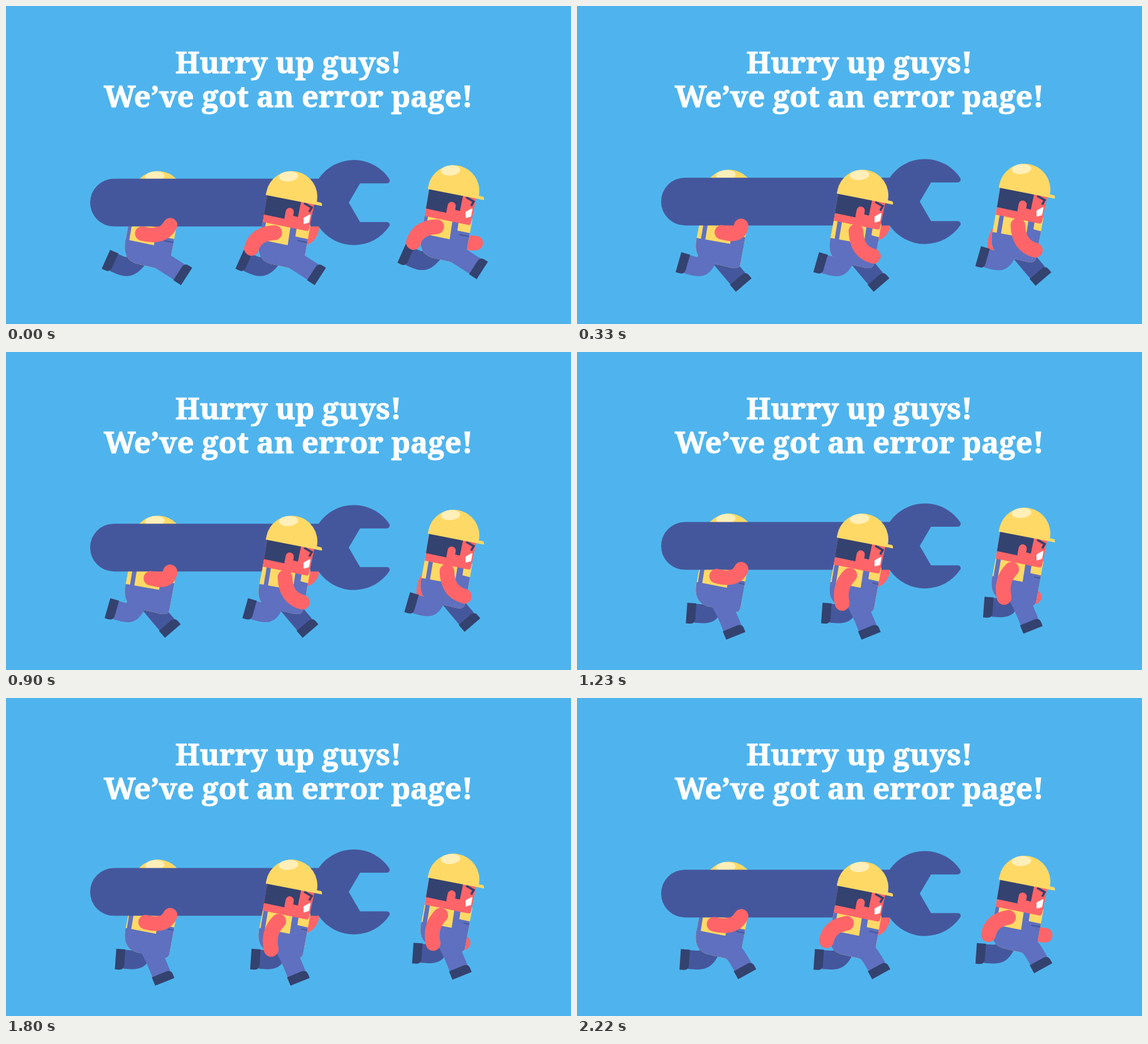
These frames come from a looping animation (900 by 506 pixels, 2.25 s). An HTML page:

```html
<!DOCTYPE html>
<html lang="en">
<head>
<meta charset="utf-8">
<title>Error page</title>
<style>
  html, body { margin: 0; width: 100%; height: 100%; overflow: hidden; background: #4fb4ed; }
  svg { display: block; width: 100vw; height: 100vh; }
  text { font: 700 47.3px "Noto Serif", serif; fill: #fff; stroke: #fff; stroke-width: 1px; text-anchor: middle; }
</style>
</head>
<body>
<svg viewBox="0 0 900 506">
  <defs>
    <clipPath id="torso">
      <path d="M411 333L485 349L473 414Q470 422 459 419L420 410C402 404 400 388 404 370Z"/>
    </clipPath>
    <g id="head">
      <path fill="#ff6568" d="M417 296L492 311L483 354Q482 359 478 358L409 344Z"/>
      <path fill="#34426f" d="M417 296L471 307L465 336L457 334L455 328L446 328L444 339L411 332Z"/>
      <path stroke="#ff6568" stroke-width="13" stroke-linecap="round" d="M452 328L450 338"/>
      <path fill="none" stroke="#34426f" stroke-width="3.500" d="M475 314L487 321L483 328"/>
      <path fill="#fff" stroke="#fff" stroke-width="2" stroke-linejoin="round" d="M475 338L484 333L482 344L475 346Z"/>
      <g transform="rotate(11 455 304)">
        <path fill="#ffd966" d="M414 304A41 41 0 0 1 496 304H502Q505 304 505 309H414Z"/>
      </g>
      <ellipse fill="#ffefb8" cx="450" cy="271.5" rx="15.5" ry="8" transform="rotate(-5 450 271)"/>
    </g>
    <path id="wrench" fill="#45579c" d="M172 275H498A68 68 0 0 1 611 276Q612 282.500 606 282.500H564L546 313L564 344H606Q612 344 611 350A68 68 0 0 1 498 351H172A38 38 0 0 1 172 275Z"/>
  </defs>
  <text x="450" y="107">Hurry up guys!</text>
  <text x="450" y="161">We’ve got an error page!</text>
  <g id="scene"></g>
</svg>
<script>
const STEP = 30, LOOP = 75, BEAT = 19, POSES = 18, HALF = POSES / 2;
const PURPLE = '#5e70bf', DARK = '#45579c', NAVY = '#34426f', RED = '#ff6568', YELLOW = '#ffd966';

// Evenly spaced key poses of one stride: ankle x, ankle y, shin direction in degrees.
const STRIDE = [
  [487, 422, 33], [462, 437, 68], [420, 436, 124],
  [387, 409, 204], [406, 416, 184], [441, 436, 142]
];

// Closed Catmull-Rom curve through the key poses.
function stride(p) {
  const n = STRIDE.length, pos = p / POSES * n, i = Math.floor(pos), t = pos - i;
  const [a, b, c, d] = [-1, 0, 1, 2].map(k => STRIDE[(i + k + n) % n]);
  return b.map((v, k) => v + t / 2 * (c[k] - a[k] +
    t * (2 * a[k] - 5 * v + 4 * c[k] - d[k] + t * (3 * (v - c[k]) + d[k] - a[k]))));
}

const swing = p => Math.pow((1 - Math.cos(2 * Math.PI * p / POSES)) / 2, 0.75);
const bounce = p => Math.sin(Math.PI * (p - 0.5) / HALF) ** 2;

const move = (x, y, content) => `<g transform="translate(${x} ${y})">${content}</g>`;
const line = (d, color, width, cap = 'round') =>
  `<path d="${d}" fill="none" stroke="${color}" stroke-width="${width}" stroke-linecap="${cap}"/>`;
const fill = (d, color) => `<path d="${d}" fill="${color}"/>`;

function leg(p, lift, color) {
  const [x, y, angle] = stride(p);
  const a = angle * Math.PI / 180;
  const along = r => `${x + r * Math.cos(a)} ${y + r * Math.sin(a)}`;
  const knee = along(-24), ankle = along(2.5);
  const hip = `${444 - 14 * swing(p)} ${395 - lift}`;
  return line(`M${hip}C${knee} ${knee} ${ankle}`, color, 30, 'butt') +
    `<path transform="translate(${ankle}) rotate(${angle})" fill="${NAVY}" d="M-1 16H13.500V-17H7Q-1 -17 -1 -9Z"/>`;
}

function arm(p) {
  const u = swing(p), t = Math.pow(u, 4 / 3);
  const elbow = `${398 + 52 * u} ${362 + 32 * Math.sin(u * Math.PI / 2)}`;
  const hand = `${391 + 89 * u} ${386 + 6 * t + 26 * Math.sin(Math.PI * t)}`;
  return line(`M${428 + 18 * u} 361Q${elbow} ${hand}`, RED, 23.5);
}

function farArm(p) {
  const u = swing(p);
  return move(14 * u - 4, -5 * u, arm(p));
}

function body(p) {
  const w = 9 * swing(p);
  return `<g clip-path="url(#torso)">` +
    fill('M395 325H495V430H395Z', YELLOW) +
    move(w, 0, line('M412 336L405 378', PURPLE, 7, 'butt') + line('M460 340L453 386', PURPLE, 10, 'butt')) +
    fill(`M395 370L${449 + w} 381L${456 + w} 366L495 374V430H395Z`, PURPLE) +
    line(`M${465 + 2 * w} 373.5L${479 + 2 * w} 376.5`, DARK, 2) +
    '</g><use href="#head"/>';
}

function runner(p, lift, legShift = 0) {
  return move(legShift, 0, leg(p + HALF, lift, DARK)) +
    move(0, -lift, body(p)) +
    move(legShift, 0, leg(p, lift, PURPLE));
}

function draw(p) {
  const u = swing(p), lift = 10 * bounce(p), tool = 7.5 * bounce(p);
  const nearArm = move(0, -lift, arm(p));
  const carry = `M${217 + 15 * u} ${362.5 - lift}Q${250 + 10 * u} ${371 - lift} 261.500 ${349 - tool + 3 * u}`;
  const grip = `M472 ${371 - tool - 7 * u}Q488 ${366 - tool - 4 * u} 488 ${345 - tool}`;
  return move(-213, 0, runner(p, lift, -7 * u)) +
    line(grip, RED, 23) +
    move(0, -tool, '<use href="#wrench"/>') +
    line(carry, RED, 23) +
    runner(p, lift) + nearArm +
    move(258, -9.5, move(0, -lift, farArm(p + HALF)) + runner(p, lift) + nearArm);
}

const scene = document.getElementById('scene');
const start = performance.now();
let shown = -1;

function tick() {
  const step = Math.floor((performance.now() - start) / STEP) % LOOP;
  // Each beat ends by holding its first pose for one extra step.
  const pose = step % BEAT % POSES;
  if (pose !== shown) {
    scene.innerHTML = draw(pose);
    shown = pose;
  }
  requestAnimationFrame(tick);
}
tick();
</script>
</body>
</html>
```
